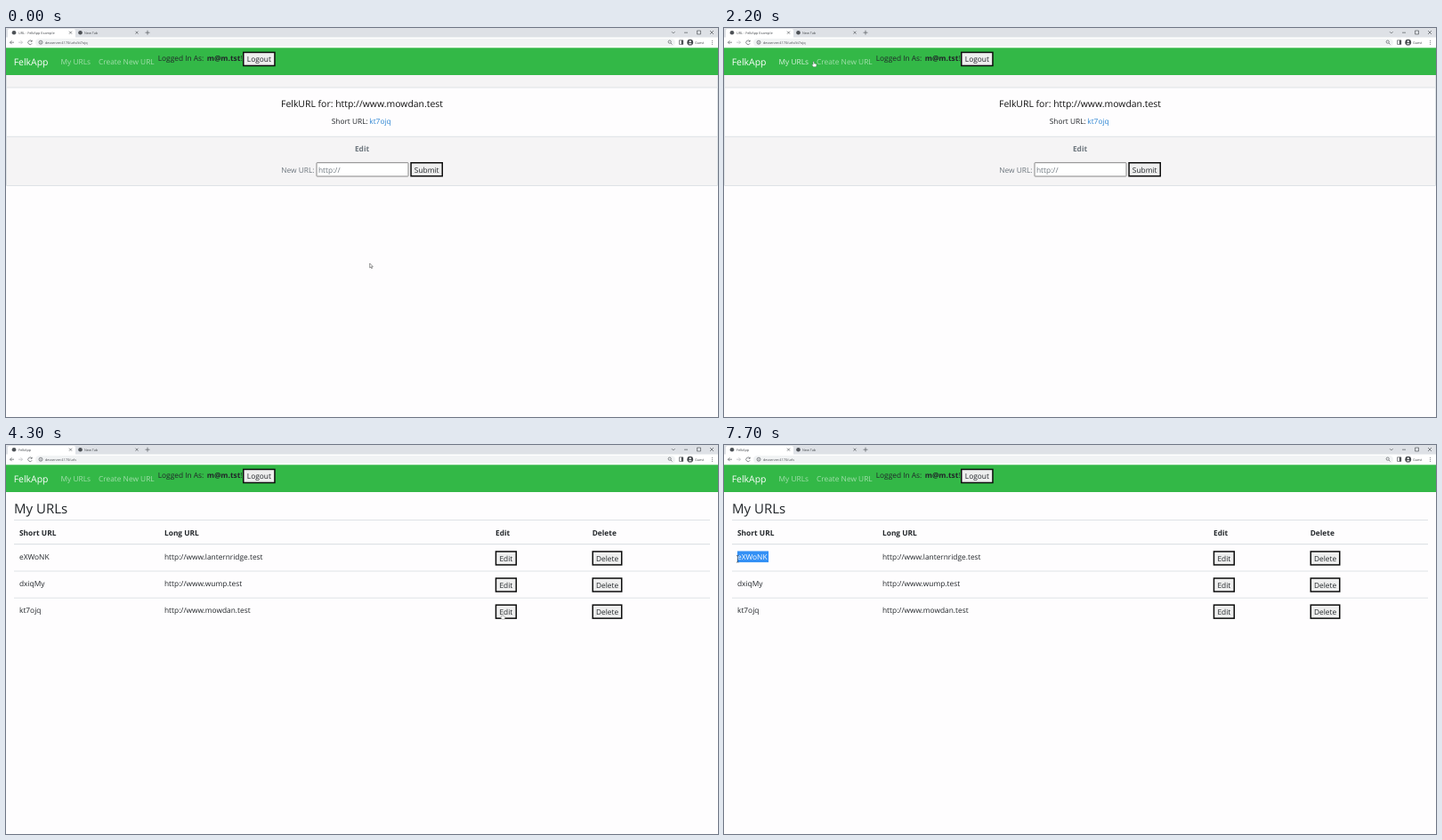
Animation, 800 px wide and 438 px high, one loop 8 s. Source, as an HTML page:

```html
<!DOCTYPE html>
<html lang="en">
<head>
<meta charset="utf-8">
<title>Short links</title>
<style>
  html, body { margin: 0; width: 100%; height: 100%; overflow: hidden; background: #fefdfe; }
  svg { display: block; width: 800px; height: 438px; }
  text { font: 8.35px "Open Sans", "Noto Sans", sans-serif; fill: #212529; text-rendering: geometricPrecision; white-space: pre; }
  .tiny { font-size: 3.8px; fill: #45494d; }
  .bold { font-weight: 700; }
  .mid { text-anchor: middle; }
  .muted { fill: #6c757d; }
  .title { font-size: 10.45px; fill: #111; }
  .icon { fill: none; stroke: #55595d; stroke-width: .7; }
  .rule { stroke: #dee2e6; fill: none; }
  .button { fill: #efefef; stroke: #0c0c0c; stroke-width: 1.5; }
  .nav { fill: #fff; fill-opacity: .55; }
  .nav.hover { fill-opacity: .8; }
</style>
</head>
<body>
<svg id="stage" viewBox="0 0 800 438"></svg>
<script>
const text = (x, y, s, cls = '', id = '') => `<text x="${x}" y="${y}" class="${cls}" id="${id}">${s}</text>`;
const box = (x, y, w, h, attrs) => `<rect x="${x}" y="${y}" width="${w}" height="${h}" ${attrs}/>`;
const button = (x, y, w, label) =>
  box(x + .75, y + .75, w - 1.5, 15, 'class="button"') + text(x + w / 2, y + 11.6, label, 'mid');
const dot = (x, y, r, color) => `<circle cx="${x}" cy="${y}" r="${r}" fill="${color}"/>`;

const browser = `
  ${box(0, 0, 800, 11, 'fill="#dee1e6"')}
  ${box(2, 1, 76, 12, 'rx="2" fill="#fff"')}
  ${box(0, 10.5, 800, 12, 'fill="#fff"')}
  ${box(33, 12, 719, 8.4, 'rx="4.2" fill="#f1f3f4"')}
  ${dot(9, 5.2, 2.3, '#4d5156')}${dot(83.5, 5.2, 2.3, '#4d5156')}
  ${text(14, 6.6, '', 'tiny', 'tab')}${text(88, 6.6, 'New Tab', 'tiny')}
  ${text(44, 17.6, '', 'tiny', 'address')}${text(774, 17.5, 'Guest', 'tiny')}
  <path class="icon" d="M71 3.7l3 3m0-3l-3 3M145.500 3.700l3 3m0-3l-3 3M156.500 5.200h5m-2.500-2.500v5
    M748 4.200l1.800 1.800 1.800-1.800M762 5.200h4M776.500 3h4v4h-4zM791 3l4 4m0-4l-4 4
    M9 16.200h-4.500m2-2l-2 2 2 2M29 15a2.300 2.300 0 1 0 .2 2.200m0-3.500v1.500h-1.600"/>
  <path class="icon" style="stroke:#b4b7bb" d="M14 16.200h4.500m-2-2l2 2-2 2"/>
  <circle class="icon" cx="39" cy="16.200" r="2"/><path class="icon" d="M39 15v.4m0 .6v1.400"/>
  <circle class="icon" cx="745.700" cy="15.600" r="1.600"/><path class="icon" d="M747 17l1.500 1.500M756.500 13.800h4.200v4.600h-4.200z"/>
  ${box(758.8, 13.8, 2, 4.6, 'fill="#45494d"')}
  ${dot(768.7, 16.2, 3.4, '#45494d')}${dot(768.7, 15.2, 1.1, '#fff')}
  <path d="M766.600 18.300q2.100-2.600 4.200 0z" fill="#fff"/>
  ${[14.2, 16.2, 18.2].map(y => dot(793.5, y, .5, '#55595d')).join('')}`;

const navbar = `
  ${box(0, 22.3, 800, 30.7, 'fill="#33b847"')}
  <text x="8.700" y="42" class="title" style="fill:#fff">FelkApp</text>
  ${text(61.5, 41, 'My URLs', 'nav', 'link')}${text(104, 41, 'Create New URL', 'nav')}
  ${text(170.7, 36.7, 'Logged In As:')}${text(225.7, 36.7, 'm@m.tst', 'bold')}${text(263.6, 36.7, '!')}
  ${button(266, 26.7, 36.7, 'Logout')}`;

const detail = `<g id="detail">
  ${box(.5, 53, 799, 124.5, 'fill="#f5f4f5"')}
  ${box(0, 67, 800, 55, 'fill="#fefdfe"')}
  <path class="rule" d="M.5 53V177.500H799.500V53M0 67h800M0 122.300h800"/>
  ${text(400, 89.3, 'FelkURL for: http://www.mowdan.test', 'title mid')}
  ${text(365.7, 107.8, 'Short URL:')}
  <text x="408.300" y="107.800" style="fill:#2f86d3">kt7ojq</text>
  ${text(400, 139, 'Edit', 'bold mid muted')}
  ${text(309.3, 162.7, 'New URL:', 'muted')}
  ${box(349, 151.7, 103, 15.3, 'rx=".5" fill="#fff" stroke="#868686"')}
  ${text(351, 162.7, 'http://', 'muted')}
  ${button(454.3, 151, 36.7, 'Submit')}
</g>`;

const rows = [['eXWoNK', 'lanternridge'], ['dxiqMy', 'wump'], ['kt7ojq', 'mowdan']];
const columns = [[15, 'Short URL'], [178, 'Long URL'], [550, 'Edit'], [658.7, 'Delete']];
const list = `<g id="list">
  <text x="9" y="77.200" style="font-size:15px">My URLs</text>
  <path class="rule" d="M9 84.500h782M9 142h782M9 172.200h782"/>
  <path class="rule" stroke-width="1.300" d="M9 111.700h782"/>
  ${columns.map(([x, s]) => text(x, 101.5, s, 'bold')).join('')}
  ${rows.map(([id, host], i) => {
    const y = 129.2 + 30.1 * i;
    return text(15, y, id) + text(178, y, `http://www.${host}.test`) +
      button(549.7, y - 10, 24.3, 'Edit') + button(658.5, y - 10, 34, 'Delete');
  }).join('')}
  <clipPath id="clip"><rect id="selection" x="15" y="119.300" width="0" height="13"/></clipPath>
  <g clip-path="url(#clip)">
    ${box(15, 119.3, 35.2, 13, 'fill="#3390f5"')}
    <text x="15" y="129.200" style="fill:#fff">${rows[0][0]}</text>
  </g>
</g>`;

const cursors = `
  <path id="arrow" d="M0 0v5l1.200-1 .8 1.800.8-.4-.8-1.700h1.600z" fill="#fff" stroke="#333" stroke-width=".5"/>
  <path id="hand" d="M-.6 0q.6-.6 1.200 0v2l2.200.5q.7.300.5 1.200l-.6 2h-3l-1.700-2.300q.3-.8 1.400 0z" fill="#fff" stroke="#555" stroke-width=".35"/>
  <path id="beam" d="M-1.200-3.500q1.200 0 1.200.6 0-.6 1.200-.6M0-3v6.500M-1.200 4.200q1.200 0 1.200-.6 0 .6 1.200.6" fill="none" stroke="#333" stroke-width=".6"/>`;

const stage = document.getElementById('stage');
stage.innerHTML = browser + navbar + detail + list + cursors;
const $ = id => document.getElementById(id);

// Pointer path: time, x, y
const path = [
  [0, 408.7, 265], [900, 410.3, 264], [1300, 410.3, 264], [2200, 100.7, 38], [3000, 95.5, 37.5],
  [3100, 95.5, 37.5], [4000, 517, 199], [4300, 557.5, 190.5], [4500, 572, 190], [4600, 572, 190],
  [5500, 47, 187], [5700, 52.6, 179], [6400, 53, 126], [6500, 53, 126.5], [7300, 15.3, 128], [8000, 15.3, 128]
];

function pointer(t) {
  const i = path.findIndex(p => p[0] > t);
  const [t0, x0, y0] = path[i - 1], [t1, x1, y1] = path[i];
  const k = (t - t0) / (t1 - t0), e = k * k * (3 - 2 * k);
  return [x0 + (x1 - x0) * e, y0 + (y1 - y0) * e];
}

function draw(now) {
  const t = Math.floor(now % 8000 / 100) * 100;
  const listed = t >= 3100;
  const [x, y] = pointer(t);
  const overNav = y < 50 && x > 58 && x < 170;
  const overEdit = listed && y > 180 && x > 550 && x < 574;
  const shape = overNav || overEdit ? 'hand' : y < 132 && x < 58 ? 'beam' : 'arrow';

  $('detail').style.display = listed ? 'none' : '';
  $('list').style.display = listed ? '' : 'none';
  $('tab').textContent = listed ? 'FelkApp' : 'URL - FelkApp Example';
  $('address').textContent = 'devserver:4170/urls' + (listed ? '' : '/kt7ojq');
  $('link').classList.toggle('hover', overNav && x < 103);

  const left = Math.max(15, x - .3);
  $('selection').setAttribute('x', left);
  $('selection').setAttribute('width', t >= 6500 ? Math.max(0, 50.2 - left) : 0);
  for (const id of ['arrow', 'hand', 'beam']) {
    $(id).style.display = id === shape ? '' : 'none';
    $(id).setAttribute('transform', `translate(${x} ${y})`);
  }
}

const start = performance.now();
function tick() {
  draw(performance.now() - start);
  requestAnimationFrame(tick);
}
tick();
</script>
</body>
</html>
```
